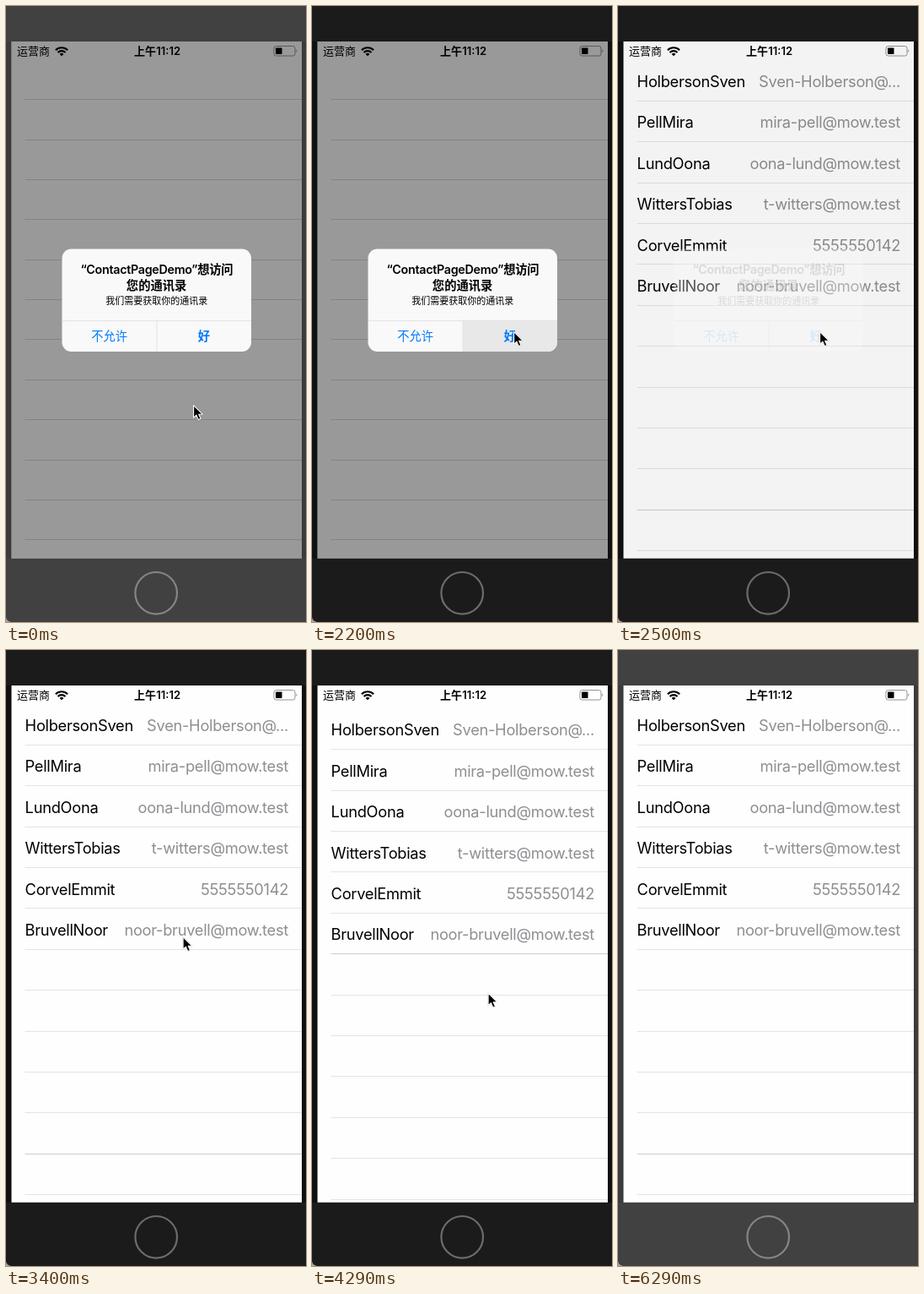
These frames come from a looping animation (356 by 729 pixels, 6.39 s). An HTML page:

```html
<!DOCTYPE html>
<html lang="zh-CN">
<head>
<meta charset="utf-8">
<title>Contacts permission</title>
<style>
  html, body { margin: 0; width: 100%; height: 100%; overflow: hidden; background: #1b1b1b; }
  svg { display: block; width: 100vw; height: 100vh; }
  text { font-family: Inter, "Noto Sans CJK SC", "Noto Sans CJK", sans-serif; }
  .status { font-size: 13px; }
  .bold { font-weight: 600; }
  .row { font-size: 18.3px; letter-spacing: -.3px; }
  .detail { fill: #8e8e93; text-anchor: end; }
  .mid { text-anchor: middle; }
  .title { font-size: 14.3px; font-weight: 600; letter-spacing: -.3px; }
  .button { font-size: 14.3px; fill: #007aff; }
  #cursor { filter: drop-shadow(0 .8px .7px rgba(0, 0, 0, .35)); }
</style>
</head>
<body>
<svg viewBox="0 0 356 729" preserveAspectRatio="none">
  <defs>
    <clipPath id="screen"><rect x="6.5" y="42" width="344.5" height="611.7"/></clipPath>
    <clipPath id="panelClip"><rect x="66.5" y="287.5" width="224.5" height="121.5" rx="11"/></clipPath>
  </defs>

  <rect id="bezel" width="356" height="729"/>
  <g id="sides">
    <rect y="42" width="7" height="612"/>
    <rect x="351" y="42" width="5" height="612"/>
  </g>
  <path d="M0 723.5Q1 728 6 729H0Z" fill="#a6a6a6"/>
  <circle id="home" cx="178.2" cy="694.8" r="24.8" fill="none" stroke-width="2.2"/>

  <g clip-path="url(#screen)">
    <rect x="6" y="42" width="346" height="612" fill="#fefefe"/>
    <g id="lines"></g>
    <g id="rows"></g>

    <text class="status" x="13" y="58.3">运营商</text>
    <g fill="none" stroke="#000" stroke-width="2.1">
      <path d="M58.9 52.2A10.2 10.2 0 0 1 73.1 52.2"/>
      <path d="M61.5 55A6.4 6.4 0 0 1 70.5 55"/>
      <path d="M66 59.3L63.6 57A3.4 3.4 0 0 1 68.4 57Z" fill="#000" stroke="none"/>
    </g>
    <text class="status bold" x="152" y="58.3">上午</text>
    <text class="status bold" x="178.3" y="58.3">11:12</text>
    <rect x="318" y="47.5" width="25" height="11.5" rx="2.5" fill="none" stroke="#929292"/>
    <rect x="320" y="49.5" width="7.5" height="7.5" rx=".8"/>
    <path d="M344.3 51.5Q346.6 53.2 344.3 55Z" fill="#929292"/>

    <rect id="dim" x="6" y="42" width="346" height="612"/>
    <g id="panel" clip-path="url(#panelClip)">
      <rect x="66" y="287" width="226" height="123" fill="#f9f9f9"/>
      <rect id="pressed" x="179" y="372" width="113" height="38" fill="#e8e8e8"/>
      <path d="M66 372.5H292M179 372.5V410" stroke="#e3e3e4" fill="none"/>
    </g>
    <g id="words">
      <text class="title mid" x="178.8" y="317.4">“ContactPageDemo”想访问</text>
      <text class="title mid" x="178.6" y="335.6" style="letter-spacing:0">您的通讯录</text>
      <text class="mid" x="178.7" y="352.6" font-size="11">我们需要获取你的通讯录</text>
      <text class="button mid" x="122.6" y="396.2">不允许</text>
      <text class="button mid bold" x="235" y="396.2">好</text>
    </g>
  </g>

  <path id="cursor" d="M.6.6V15.2L3.9 12.2L6.3 17.6L9 16.4L6.7 11.2H11.2Z"
        stroke="#fff" stroke-width="1.1" stroke-linejoin="round"/>
</svg>
<script>
const LOOP = 6390;
const $ = id => document.getElementById(id);
const setAll = (id, attrs) => {
  for (const name in attrs) $(id).setAttribute(name, attrs[name]);
};

const contacts = [
  ["HolbersonSven", "Sven-Holberson@..."],
  ["PellMira", "mira-pell@mow.test"],
  ["LundOona", "oona-lund@mow.test"],
  ["WittersTobias", "t-witters@mow.test"],
  ["CorvelEmmit", "5555550142"],
  ["BruvellNoor", "noor-bruvell@mow.test"]
];

function add(parent, tag, attrs, text = "") {
  const el = document.createElementNS("http://www.w3.org/2000/svg", tag);
  for (const name in attrs) el.setAttribute(name, attrs[name]);
  el.textContent = text;
  return parent.appendChild(el);
}

contacts.forEach(([name, detail], i) => {
  const y = 96 + 48.4 * i;
  add($("rows"), "text", { class: "row", x: 22.6, y }, name);
  add($("rows"), "text", { class: "row detail", x: 335, y }, detail);
});
const lines = Array.from({ length: 12 }, () =>
  add($("lines"), "rect", { x: 22.5, width: 329, height: 1 }));

// Number of steps done when `count` steps fall evenly from `start` to `end`.
function stepsDone(time, start, end, count) {
  const done = Math.floor((time - start) / (end - start) * (count - 1) + 1e-6) + 1;
  return Math.min(Math.max(done, 0), count);
}
const ease = p => p * p * (3 - 2 * p);

const cursorHome = [222, 472];
const moves = [
  { start: 1050, end: 1930, count: 7, to: [239, 385] },
  { start: 3250, end: 3400, count: 2, to: [209.5, 339] },
  { start: 3840, end: 4290, count: 4, to: [208.5, 405.5] },
  { start: 4440, end: 4730, count: 3, to: [195, 499] },
  { start: 5030, end: 5480, count: 4, to: [332, 752] }
];

function cursorAt(time) {
  return moves.reduce((from, { start, end, count, to }) => {
    const p = ease(stepsDone(time, start, end, count) / count);
    return from.map((v, axis) => v + (to[axis] - v) * p);
  }, cursorHome);
}

// The list is pulled down for three steps, then springs back.
function scrollAt(time) {
  const step = stepsDone(time, 3840, 4730, 7);
  return step <= 3 ? 29 * step / 3 : 29 * 0.186 ** (step - 3);
}

function drawLines(loaded, scroll) {
  const [top, pitch] = loaded ? [112.3, 48.4] : [110.65, 47.38];
  const darkLine = scroll > 1 ? 5 : 10;
  lines.forEach((line, i) => {
    line.setAttribute("y", Math.floor(top + pitch * i + scroll));
    line.setAttribute("fill", !loaded ? "#dadadb" : i === darkLine ? "#cdcdcd" : "#e4e4e5");
  });
}

function draw(time) {
  const active = time >= 2200 && time < 6290;
  setAll("bezel", { fill: active ? "#1b1b1b" : "#414141" });
  setAll("sides", { fill: active ? "#101010" : "#3b3b3b" });
  setAll("home", { stroke: active ? "#6c6c6c" : "#858585" });

  const alertStep = stepsDone(time, 2200, 2650, 4);
  const left = Math.min(1, (4 - alertStep) / 3);
  setAll("pressed", { opacity: alertStep === 1 ? 1 : 0 });
  setAll("dim", { opacity: 0.4 * left ** 2 });
  setAll("panel", { opacity: left });
  setAll("words", { opacity: left ** 2 });

  const loaded = alertStep >= 3;
  const scroll = scrollAt(time);
  drawLines(loaded, scroll);
  setAll("rows", { visibility: loaded ? "visible" : "hidden", transform: `translate(0 ${scroll})` });
  setAll("cursor", { transform: `translate(${cursorAt(time)})` });
}

function tick() {
  draw(performance.now() % LOOP);
  requestAnimationFrame(tick);
}
tick();
</script>
</body>
</html>
```
